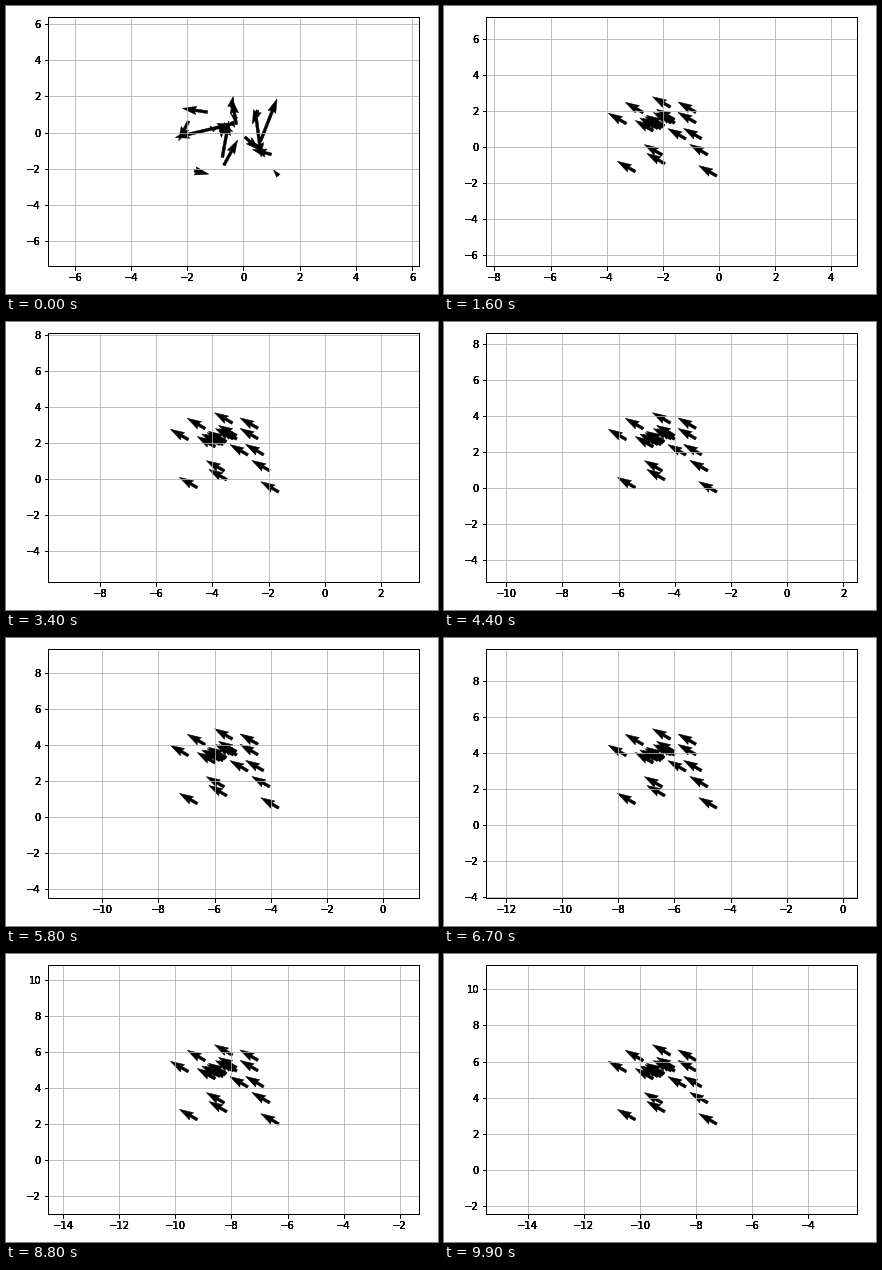
These frames come from a looping animation (432 px wide and 288 px high, 10000 ms). A matplotlib script:

```python
import matplotlib.pyplot as plt
import numpy as np
from matplotlib.animation import FuncAnimation
from matplotlib.ticker import MultipleLocator

W, H, DPI = 432, 288, 72
LEFT, BOTTOM, WIDTH, HEIGHT = 42, 28, 371, 249
FRAMES, STEP = 100, 0.1
MARGIN = 5
ARROW = WIDTH / 18  # pixels per unit of speed
HEADING = np.deg2rad(150)
DRIFT = np.array([np.cos(HEADING), np.sin(HEADING)])

rng = np.random.default_rng(4)

# loose outer agents, clockwise from the left, then a dense row in the middle
OUTER = [(-2.0, 0.54), (-1.4, 1.15), (-0.43, 1.46), (0.48, 1.17),
         (0.48, 0.59), (0.68, -0.3), (0.9, -1.19), (1.22, -2.37),
         (-0.63, -1.69), (-0.72, -1.2), (-1.68, -2.13), (0.12, -0.31)]
row = np.linspace((-1.0, 0.15), (-0.18, 0.6), 8)
row += rng.normal(0, 0.07, row.shape)
flock = np.vstack([OUTER, row])

# before they agree, agents head anywhere at any speed
speed = rng.rayleigh(0.8, len(flock))
angle = rng.uniform(0, 2 * np.pi, len(flock))
first = np.column_stack([speed * np.cos(angle), speed * np.sin(angle)])


def state(frame):
    """Positions and velocities: one random step, then a shared heading."""
    if frame == 0:
        return flock - STEP * first, first
    pos = flock + (frame - 1) * STEP * DRIFT
    return pos, np.tile(DRIFT, (len(flock), 1))


fig = plt.figure(figsize=(W / DPI, H / DPI), dpi=DPI, facecolor="white")
rect = [LEFT / W, BOTTOM / H, WIDTH / W, HEIGHT / H]
ax = fig.add_axes(rect)
ax.grid(True)
ax.xaxis.set_major_locator(MultipleLocator(2))
ax.yaxis.set_major_locator(MultipleLocator(2))
# stacked empty axes make the frame and tick labels heavier
for i in range(4):
    fig.add_axes(rect, sharex=ax, sharey=ax, facecolor="none", label=f"bold{i}")

arrows = ax.quiver(*flock.T, *first.T, color="black", scale_units="dots",
                   scale=1 / ARROW, width=0.0075, edgecolor="black",
                   linewidth=0.5)


def draw(frame):
    pos, vel = state(frame)
    arrows.set_offsets(pos)
    arrows.set_UVC(*vel.T)
    low, high = pos.min(axis=0) - MARGIN, pos.max(axis=0) + MARGIN
    ax.set_xlim(low[0], high[0])
    ax.set_ylim(low[1], high[1])
    return (arrows,)


anim = FuncAnimation(fig, draw, frames=FRAMES, interval=100,
                     init_func=lambda: draw(0), repeat=True, repeat_delay=0)
plt.show()
```
